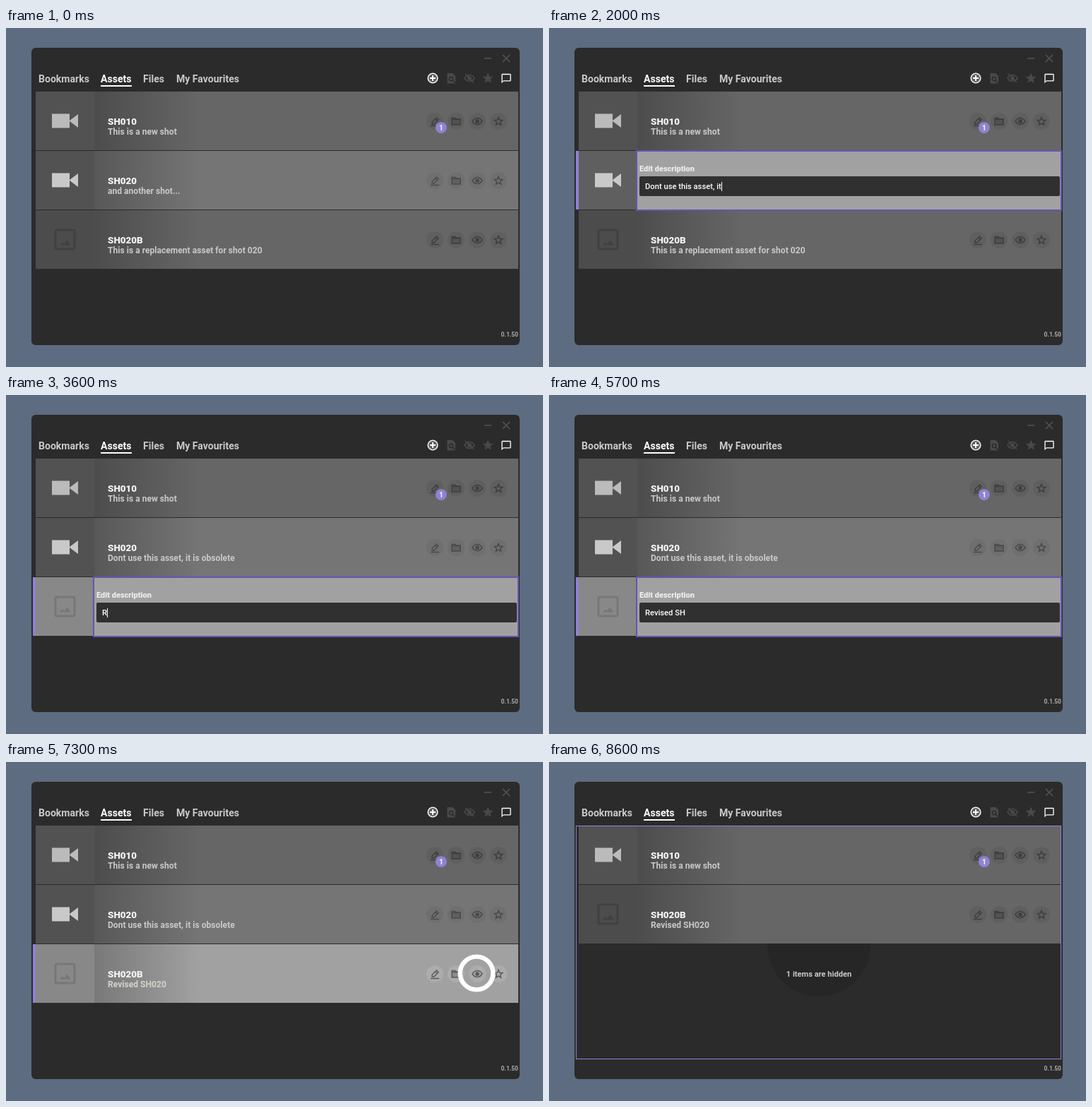
These frames come from a looping animation (760 px wide and 480 px high, 8.7 s). An HTML page:

```html
<!DOCTYPE html>
<html lang="en">
<head>
<meta charset="utf-8">
<style>
html, body { margin: 0; width: 100%; height: 100%; overflow: hidden; background: #5d6c80; }
svg { display: block; width: 760px; height: 480px; }
text { font-family: Roboto, sans-serif; font-weight: 700; fill: #c8c8c8; white-space: pre; }
.tab { font-size: 14.05px; }
.title { font-size: 13.4px; font-weight: 900; fill: #f4f4f4; }
.note { font-size: 12.1px; }
.label { font-size: 11px; font-weight: 900; fill: #ededed; }
.field { font-size: 11.2px; font-weight: 500; fill: #fff; }
</style>
</head>
<body>
<svg viewBox="0 0 760 480">
  <defs>
    <linearGradient id="shade"><stop stop-opacity=".25"/><stop offset="1" stop-opacity="0"/></linearGradient>
    <!-- Icons are centred on the origin -->
    <g id="pencil" fill="none" stroke="currentColor" stroke-width="1.4">
      <path d="M-4 4V1.3L2.3-5 5-2.3-1.3 4ZM.6-3.3 3.3-.6M-6 6.5H6"/>
    </g>
    <path id="folder" d="M-6-4.5H-1.3L.2-3H6V5H-6ZM-6-2.5H6" fill="currentColor" fill-opacity=".4" stroke="currentColor" stroke-width="1.5"/>
    <g id="eye" fill="none" stroke="currentColor" stroke-width="1.5">
      <path d="M-7 0Q-4-4.5 0-4.5T7 0Q4 4.5 0 4.5T-7 0Z"/><circle r="2.1" fill="currentColor"/>
    </g>
    <path id="star" d="M0-5.6 1.6-1.8 5.7-1.5 2.6 1.2 3.5 5.2 0 3.1-3.5 5.2-2.6 1.2-5.7-1.5-1.6-1.8Z" fill="none" stroke="currentColor" stroke-width="1.5"/>
    <path id="camera" d="M-18.5-10H6.5V-.5L18.5-9.5V9.5L6.5 .5V10H-18.5Z" fill="currentColor"/>
    <g id="image">
      <rect x="-13.5" y="-13.5" width="27" height="27" rx="2" fill="none" stroke="currentColor" stroke-width="3"/>
      <path d="M-8 8-4 4-1 6 3 1 8 8Z" fill="currentColor"/>
    </g>
  </defs>
  <rect width="760" height="480" fill="#5d6c80"/>
  <rect x="36" y="28" width="691" height="421" rx="6" fill="#2b2b2b"/>
  <path d="M677 43H687M703 38 713 48M713 38 703 48" stroke="#535353" stroke-width="1.6"/>
  <text class="tab" x="46" y="77">Bookmarks</text>
  <text class="tab" x="134" y="77" style="fill:#fff">Assets</text>
  <text class="tab" x="194" y="77">Files</text>
  <text class="tab" x="241" y="77">My Favourites</text>
  <rect x="134" y="81" width="44" height="2" fill="#fff"/>
  <circle cx="604" cy="71" r="6.8" fill="#606060" stroke="#f2f2f2" stroke-width="1.6"/>
  <path d="M600 71H608M604 67V75" stroke="#fff" stroke-width="1.8"/>
  <g color="#4a4a4a" stroke="#4a4a4a">
    <path d="M624.5 64H632L636 68V78.5H624.5Z" fill="#4a4a4a" stroke="none"/>
    <path d="M632 74 635.5 77.5" stroke="#2b2b2b" stroke-width="1.5"/>
    <circle cx="630" cy="72" r="2.7" fill="none" stroke="#2b2b2b" stroke-width="1.5"/>
    <use href="#eye" x="656" y="71"/><path d="M650 65 662 77" stroke-width="1.6"/>
    <use href="#star" x="682" y="71"/><circle cx="682" cy="71" r="2.5" fill="#4a4a4a"/>
  </g>
  <path transform="translate(700 63.5) scale(.667)" fill="#fff" d="M20 2H4Q2 2 2 4V22L6 18H20Q22 18 22 16V4Q22 2 20 2ZM20 16H6L4 18V4H20Z" fill-rule="evenodd"/>
  <text x="725" y="437" text-anchor="end" style="font-size:8.5px;fill:#aaa">0.1.50</text>
  <g id="scene"></g>
</svg>
<script>
const LOOP = 8700;
const PURPLE = '#8d82d4';
const TONES = { plain: '#666', light: '#757575', selected: '#a1a1a1' };
const scene = document.getElementById('scene');

const firstEdit = { open: 500, close: 2600, before: 'and another shot...', text: 'Dont use this asset, it is obsolete',
  keys: Array.from({ length: 35 }, (_, i) => 900 + i * 48) };
const secondEdit = { open: 3200, close: 6600, before: 'This is a replacement asset for shot 020', text: 'Revised SH020',
  keys: [3500, 3800, 4000, 4400, 4600, 4700, 4800, 4900, 5100, 5200, 6100, 6250, 6400] };

const within = (t, start, end) => t >= start && t < end;
const isOpen = (edit, t) => within(t, edit.open, edit.close);

function typed(edit, t) {
  const count = edit.keys.filter(key => key <= t).length;
  return count ? edit.text.slice(0, count) : edit.before;
}

function caretVisible(edit, t) {
  const lastKey = edit.keys.filter(key => key <= t).pop() ?? edit.open;
  return (t - lastKey) % 1000 < 500;
}

const box = (x, y, w, h, fill, extra = '') =>
  `<rect x="${x}" y="${y}" width="${w}" height="${h}" fill="${fill}" ${extra}/>`;
const label = (kind, x, y, content, extra = '') => `<text class="${kind}" x="${x}" y="${y}" ${extra}>${content}</text>`;
const icon = (name, x, y, color) => `<use href="#${name}" x="${x}" y="${y}" color="${color}"/>`;

function buttons(y, tone) {
  const disc = { plain: '#5f5f5f', light: '#6f6f6f', selected: '#acacac' }[tone];
  const ink = { plain: '#3e3e3e', light: '#4a4a4a', selected: '#5a5a5a' }[tone];
  return ['pencil', 'folder', 'eye', 'star'].map((name, i) => {
    const x = 607 + i * 30;
    return `<circle cx="${x}" cy="${y}" r="12" fill="${disc}"/>` + icon(name, x, y, ink);
  }).join('');
}

function editor(y, edit, t) {
  return box(124, y, 601, 84, TONES.selected, 'stroke="#6056b0" stroke-width="2"') +
    label('label', 128, y + 29, 'Edit description') +
    box(128, y + 36, 595, 28, '#303030', 'rx="2"') +
    label('field', 136, y + 54, typed(edit, t));
}

function row(y, { title, note, tone, picture, selected, edit, badge }, t) {
  const shownTone = selected ? 'selected' : tone;
  const isImage = picture === 'image';
  const thumb = selected ? (isImage ? '#888' : '#5f5f5f') : isImage ? '#4c4c4c' : '#525252';
  const pictureColor = isImage ? (selected ? '#777' : '#414141') : tone === 'light' ? '#c9c9c9' : '#bbb';
  let out = box(42, y, 83, 83, thumb) + box(125, y, 600, 83, TONES[shownTone]) + box(125, y, 150, 83, 'url(#shade)');
  if (selected) out += box(38, y, 4, 83, PURPLE);
  out += icon(picture, 83.5, y + 41.5, pictureColor);
  if (edit && isOpen(edit, t)) return out + editor(y, edit, t);
  out += label('title', 144, y + 47, title) + buttons(y + 42, shownTone) +
    label('note', 144, y + 61, note, selected ? 'style="fill:#d2d2cc"' : '');
  if (badge) {
    out += `<circle cx="615.8" cy="141.2" r="8" fill="${PURPLE}"/>` +
      label('label', 616, 145, '1', 'text-anchor="middle" style="font-size:10px"');
  }
  return out;
}

function ripple(t) {
  const p = (t - 7100) / 1000;
  if (p <= 0 || p >= 1) return '';
  return `<circle cx="666" cy="299" r="${65 * (1 - (1 - p) ** 2)}" fill="none" stroke="#fff" stroke-width="${8 * (1 - p)}"/>`;
}

function hiddenNotice() {
  return '<circle cx="382" cy="259" r="73" fill="#262626"/>' +
    label('note', 382, 304, '1 items are hidden', 'text-anchor="middle" style="font-size:11.1px"');
}

function drawCaret(edit, y, t) {
  if (!isOpen(edit, t) || !caretVisible(edit, t)) return;
  const x = Math.round(136 + scene.querySelector('.field').getComputedTextLength());
  scene.insertAdjacentHTML('beforeend', box(x, y + 44, 1, 13, '#fff'));
}

function render(t) {
  const hidden = t >= 7500;
  const first = { title: 'SH010', note: 'This is a new shot', tone: 'plain', picture: 'camera', badge: true };
  const second = { title: 'SH020', note: typed(firstEdit, t), tone: 'light', picture: 'camera',
    selected: within(t, 300, 3000), edit: firstEdit };
  const third = { title: 'SH020B', note: typed(secondEdit, t), tone: 'plain', picture: 'image',
    selected: within(t, 3000, 8300), edit: secondEdit };

  const rows = hidden
    ? hiddenNotice() + row(90, first, t) + row(174, third, t) + box(38.5, 90.5, 686, 330, 'none', `stroke="${PURPLE}"`)
    : row(90, first, t) + (isOpen(firstEdit, t)
      ? row(258, third, t) + row(174, second, t)
      : row(174, second, t) + row(258, third, t));
  scene.innerHTML = rows + ripple(t);
  drawCaret(firstEdit, 174, t);
  drawCaret(secondEdit, 258, t);
}

function tick(now) {
  render(Math.floor((now % LOOP) / 100) * 100);
  requestAnimationFrame(tick);
}
requestAnimationFrame(tick);
</script>
</body>
</html>
```
